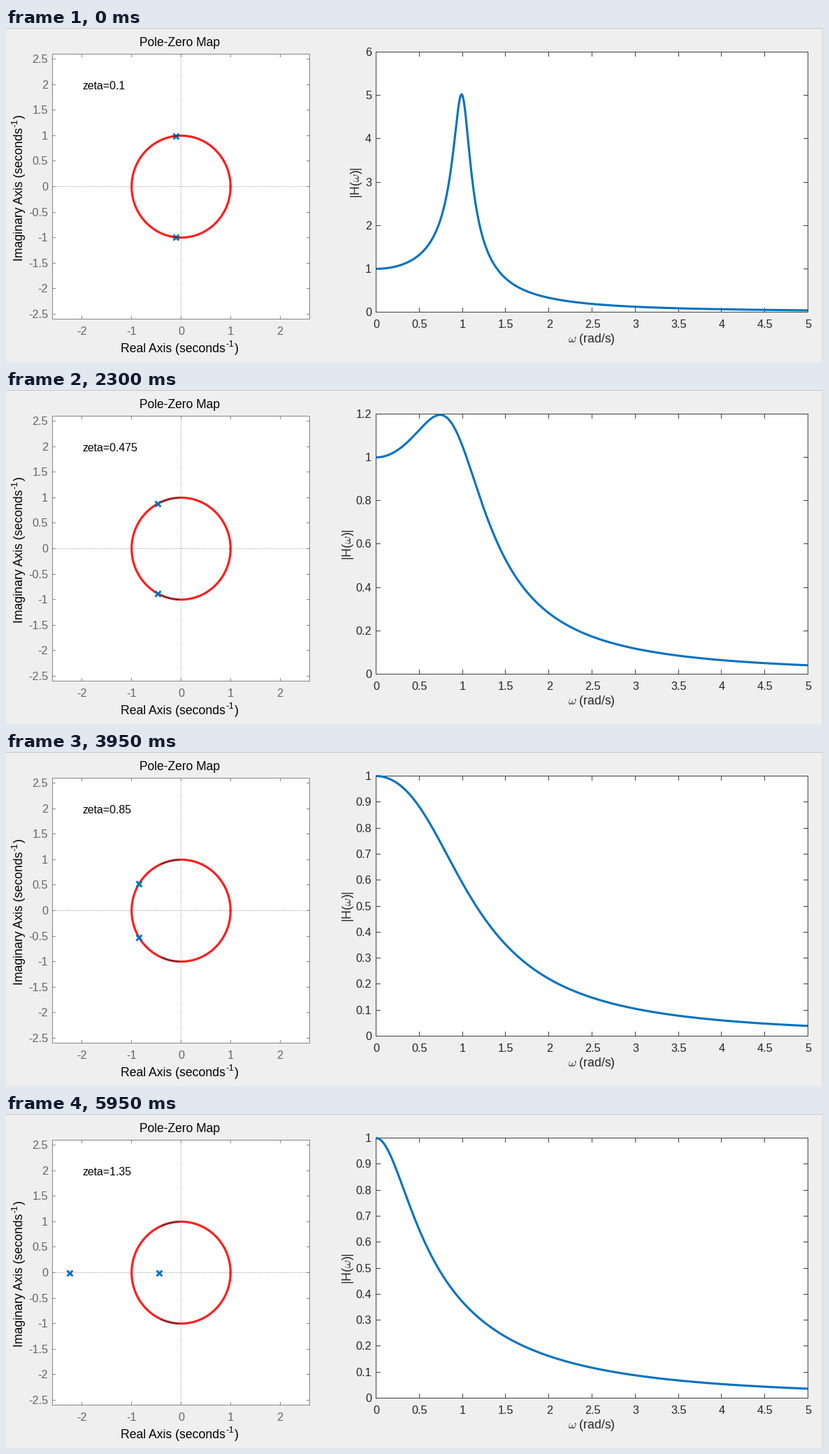
A matplotlib script for the animation above (6.95 s loop, 1169x479 px).

```python
import matplotlib.pyplot as plt
import numpy as np
from matplotlib.animation import FuncAnimation
from matplotlib.patches import Rectangle

W, H, DPI = 1169, 479, 64
PX = 72 / DPI  # points per pixel
STEP, LOOP = 50, 6950

BLUE, RED, DARK, GRAY = "#0072bd", "#fc2020", "#262626", "#666666"
FRAME0, FRAME1 = "#858585", "#404040"
L0, R0, T0, B0 = 66.5, 434.5, 37.5, 417.5      # pole-zero axes
L1, R1, T1, B1 = 529.5, 1147.5, 34.5, 407.5    # magnitude axes

# start (ms), delay of the zeta label, delay of the curve
STAGES = [(0, 0, 0), (1000, 50, 0), (1500, 50, 0), (2300, 0, 0),
          (2800, 50, 50), (3300, 50, 0), (3900, 50, 0), (4500, 0, 0),
          (4950, 50, 0), (5450, 0, 0), (5950, 0, 0)]
ZETAS = [0.1 + 0.125 * k for k in range(len(STAGES))]
# upper limit -> (tick step, x of the axis label)
SCALES = {6: (1, 506), 2.5: (0.5, 494), 1.6: (0.2, 494),
          1.2: (0.2, 494), 1: (0.1, 494)}

plt.rcParams["font.family"] = "Liberation Sans"
plt.rcParams["mathtext.fontset"] = "cm"

fig = plt.figure(figsize=(W / DPI, H / DPI), dpi=DPI, facecolor="#efefef")
ax = fig.add_axes([0, 0, 1, 1])
ax.set(xlim=(0, W), ylim=(H, 0))
ax.autoscale(False)
ax.axis("off")


def line(x, y, color, width=1, **kw):
    return ax.plot(x, y, color=color, lw=width * PX, snap=False, **kw)[0]


def text(x, y, s, size=16.3, color=DARK, ha="center", **kw):
    return ax.text(x, y, s, size=size * PX, color=color, ha=ha,
                   va="baseline", **kw)


def box(left, right, top, bottom, color):
    ax.add_patch(Rectangle((left, top), right - left, bottom - top,
                           fc="white", ec=color, lw=PX, snap=False, zorder=1))


def mid(v):
    """Centre of the pixel that holds v."""
    return np.floor(v) + 0.5


def xtick(x, top, bottom, size, color):
    x = mid(x)
    return [line([x, x], [top, top + size], color),
            line([x, x], [bottom, bottom - size], color)]


def ytick(y, left, right, size, color):
    y = mid(y)
    return [line([left, left + size], [y, y], color),
            line([right, right - size], [y, y], color)]


def pole_xy(re, im):
    return ((L0 + R0) / 2 + 70.77 * np.asarray(re),
            (T0 + B0) / 2 - 73.08 * np.asarray(im))


def seconds_label(x, y, s, advance, rotation=0):
    """Axis label ending in a raised -1 and a closing bracket."""
    for part, along, up, size in [(s, 0, 0, 17.6), ("-1", advance, 8, 13.2),
                                  (")", advance + 11.8, 0, 17.6)]:
        px, py = (x - up, y - along) if rotation else (x + along, y - up)
        text(px, py, part, size, "black", "left", rotation=rotation,
             rotation_mode="anchor")


def gain(w, zeta):
    return 1 / np.hypot(1 - w**2, 2 * zeta * w)


def top_limit(zeta):
    peak = gain(omega, zeta).max()
    return min(s for s in SCALES if s >= peak - 1e-9)


# window edges
line([0, W], [0.5, 0.5], "#c6c6c6")
line([W - 0.5, W - 0.5], [0, H], "#d4d4d4")

# pole-zero map
box(L0, R0, T0, B0, FRAME0)
for v in range(-2, 3):
    x = pole_xy(v, 0)[0]
    xtick(x, T0, B0, 4, FRAME0)
    text(x, 440, f"{v}", color=GRAY)
for v in np.arange(-2.5, 2.6, 0.5):
    y = pole_xy(0, v)[1]
    ytick(y, L0, R0, 4, FRAME0)
    text(60, y + 5.5, f"{v:g}", color=GRAY, ha="right")
x0, y0 = pole_xy(0, 0)
dots = dict(ls=(0, (1, 2)), zorder=2)
line([L0, R0], [y0, y0], "#808080", **dots)
line([x0, x0], [T0, B0], "#808080", **dots)
text(248.5, 25.5, "Pole-Zero Map", 17.5, "black")
seconds_label(164, 465, "Real Axis (seconds", 150.6)
seconds_label(24, 334, "Imaginary Axis (seconds", 191.7, 90)

angle = np.linspace(0, 2 * np.pi, 400)
line(*pole_xy(np.cos(angle), np.sin(angle)), RED, 3.2, zorder=3)
poles = line([], [], BLUE, ls="", marker="x", ms=8.2 * PX, mew=2.9 * PX,
             zorder=4)
zeta_text = text(109, 87.5, "", 15.9, "black", "left")

# dark overlap left on the circle by the first poles
trail = []
for z in ZETAS[:3]:
    a = np.arccos(-z) + np.linspace(-0.063, 0.063, 9)
    trail.append([line(*pole_xy(np.cos(a), s * np.sin(a)), "#5c2c30", 1.7,
                       zorder=5, solid_capstyle="butt") for s in (1, -1)])

# magnitude response
box(L1, R1, T1, B1, FRAME1)
for v in np.arange(0, 5.1, 0.5):
    x = L1 + v * (R1 - L1) / 5
    xtick(x, T1, B1, 6, FRAME1)
    text(x + 0.5, 430, f"{v:g}")
text(838, 451, r"$\omega$ (rad/s)", 17.6)

groups = {}
for limit, (step, label_x) in SCALES.items():
    items = [text(label_x, 222, r"|H($\omega$)|", 17.6, rotation=90,
                  rotation_mode="anchor")]
    for v in np.arange(0, limit + step / 2, step):
        y = B1 - v / limit * (B1 - T1)
        items += ytick(y, L1, R1, 6, FRAME1)
        items.append(text(523, y + 5.5, f"{v:.3g}", ha="right"))
    groups[limit] = items

omega = np.linspace(0, 5, 501)
curve = line([], [], BLUE, 3.1, zorder=4, solid_capstyle="butt")


def update(i):
    t = i * STEP
    k = max(n for n, stage in enumerate(STAGES) if stage[0] <= t)
    start, label_lag, curve_lag = STAGES[k]
    zeta = ZETAS[k]

    root = np.sqrt(complex(zeta**2 - 1))
    p = np.array([-zeta + root, -zeta - root])
    poles.set_data(*pole_xy(p.real, p.imag))
    zeta_text.set_text(f"zeta={zeta:g}" if t >= start + label_lag else "")
    for n, arcs in enumerate(trail):
        for arc in arcs:
            arc.set_visible(n <= k)

    shown = zeta if t >= start + curve_lag else ZETAS[k - 1]
    limit = top_limit(shown)
    curve.set_data(L1 + omega * (R1 - L1) / 5,
                   B1 - gain(omega, shown) / limit * (B1 - T1))
    for key, items in groups.items():
        for item in items:
            item.set_visible(key == limit)
    return []


anim = FuncAnimation(fig, update, frames=LOOP // STEP, interval=STEP,
                     repeat=True, repeat_delay=0, blit=False)
plt.show()
```
